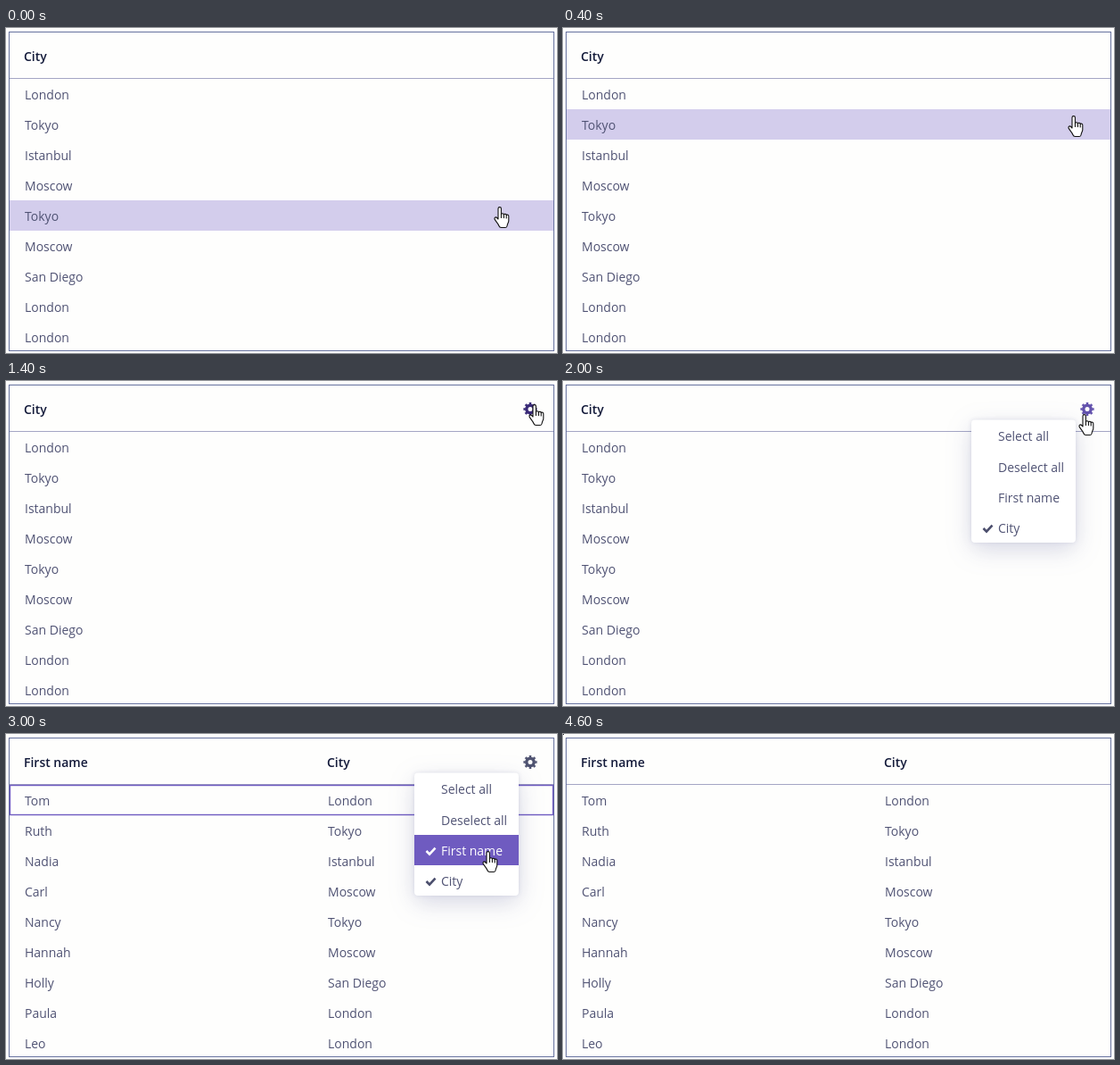
An HTML page for the animation above (5800 ms loop, 618x364 px).

```html
<!DOCTYPE html>
<html lang="en">
<head>
<meta charset="utf-8">
<title>Column chooser</title>
<style>
html, body { margin: 0; width: 100%; height: 100%; overflow: hidden; background: #fefefd; }
svg { display: block; width: 618px; height: 364px; }
text { font: 14px "Open Sans", sans-serif; fill: #505374; }
.head { font-weight: 600; fill: #131a3a; }
#menu { filter: drop-shadow(0 8px 14px rgba(80, 85, 150, .2)) drop-shadow(0 0 2px rgba(60, 65, 120, .14)); }
.tick { fill: none; stroke: #4a4d6c; stroke-width: 2.6; }
.on text { fill: #fff; }
.on .tick { stroke: #fff; }
.item rect { fill: none; }
.item.on rect { fill: #6f5bc0; }
</style>
</head>
<body>
<svg id="stage" viewBox="0 0 618 364">
  <defs>
    <clipPath id="gridClip"><rect x="4" y="5" width="610" height="356"/></clipPath>
  </defs>
  <rect width="618" height="364" fill="#fefefd"/>
  <g clip-path="url(#gridClip)">
    <rect id="hover" x="4" width="610" height="34" fill="#d3cdec"/>
    <g id="names"></g>
    <g id="cities"></g>
  </g>
  <path d="M4 56.5H614" stroke="#a4a6c4"/>
  <rect x="3.5" y="4.5" width="611" height="357" fill="none" stroke="#66719f"/>
  <rect id="focus" x="4.5" y="57.5" width="609" height="33" fill="none" stroke="#6f5bc0" stroke-width="1.4"/>
  <g id="gear" transform="translate(588 31.5)" fill="none" stroke="currentColor">
    <circle r="4.2" stroke-width="3.4"/>
    <circle r="6.2" stroke-width="2.8" pathLength="16" stroke-dasharray="1 1" stroke-dashoffset=".5"/>
  </g>
  <g id="menu"><rect x="458" y="43.5" width="117" height="137.5" rx="4" fill="#fff"/></g>
  <g id="hand" stroke="#111" stroke-width="1.1" stroke-linejoin="round" stroke-linecap="round">
    <path fill="#fff" d="M5 14V2.3a1.7 1.7 0 0 1 3.4 0V8.5c.6-1.2 2.8-1 3 .4c.7-1 2.6-.7 2.8.6c.9-.7 2.6-.2 2.6 1.3V16c0 2-1.5 3-1.7 5.5c-.2 1.8-.9 2-2 2H8.3c-1.4 0-1.9-.6-2.3-1.7C5.4 19.7 3 17.5 1.2 14.4C.2 12.4 2.3 11.2 3.6 12.5z"/>
    <path fill="none" d="M8.4 8.5v4M11.4 9v3.6M14.2 9.6V13"/>
  </g>
  <rect id="dot" width="1" height="1" fill="#222"/>
</svg>
<script>
const LOOP = 5800, ROW = 34;
const NAMES = ['Tom', 'Ruth', 'Nadia', 'Carl', 'Nancy', 'Hannah', 'Holly', 'Paula', 'Leo'];
const CITIES = ['London', 'Tokyo', 'Istanbul', 'Moscow', 'Tokyo', 'Moscow', 'San Diego', 'London', 'London'];
const ITEMS = [['Select all', 44], ['Deselect all', 78.5], ['First name', 113], ['City', 147]];
const GRAY = '#505472', HOVER = '#6453ad', PRESSED = '#3a2b78';

const $ = id => document.getElementById(id);

function add(parent, tag, attrs, label = '') {
  const el = document.createElementNS('http://www.w3.org/2000/svg', tag);
  for (const key in attrs) el.setAttribute(key, attrs[key]);
  el.textContent = label;
  parent.append(el);
  return el;
}

function column(parent, title, values) {
  add(parent, 'text', { x: 20, y: 37, class: 'head' }, title);
  values.forEach((value, i) => add(parent, 'text', { x: 21, y: 80 + i * ROW }, value));
}
column($('names'), 'First name', NAMES);
column($('cities'), 'City', CITIES);

const items = ITEMS.map(([label, y]) => {
  const g = add($('menu'), 'g', { class: 'item' });
  add(g, 'rect', { x: 458, y, width: 117, height: 34 });
  add(g, 'text', { x: 488, y: y + 23 }, label);
  const tick = add(g, 'path', { class: 'tick', d: `M471.5 ${y + 18}l3.5 3.6l6.5-7` });
  return { g, tick };
});

// Each step lists only what changes; the rest carries over.
let last = {};
const steps = [
  [0, { hand: [547, 200], row: 4, gear: null, menu: 0, item: -1, both: false, checked: false, focus: false, dot: false }],
  [200, { hand: [553, 146], row: 2 }],
  [400, { hand: [566, 98], row: 1 }],
  [600, { hand: [581, 54], row: 0 }],
  [800, { hand: [584, 36], row: -1 }],
  [1000, { hand: [585, 28], gear: HOVER }],
  [1200, { hand: [586, 26] }],
  [1400, { gear: PRESSED }],
  [1600, { gear: HOVER, menu: .75 }],
  [1800, { hand: [584, 28], menu: 1 }],
  [2000, { hand: [578, 37] }],
  [2200, { hand: [556, 94], gear: GRAY, item: 1 }],
  [2400, { hand: [537, 125], item: 2 }],
  [2800, { checked: true }],
  [3000, { hand: [534, 131], both: true, focus: true }],
  [3400, { hand: [552, 112], item: 1, focus: false }],
  [3600, { hand: [600, 13], item: -1 }],
  [3800, { hand: null, gear: null }],
  [4200, { dot: true }],
  [4400, { menu: .75 }],
  [4600, { menu: 0 }]
].map(([at, change]) => ({ at, ...(last = { ...last, ...change }) }));

const show = (el, visible) => { el.style.display = visible ? '' : 'none'; };

function render(s) {
  show($('hand'), s.hand);
  if (s.hand) $('hand').setAttribute('transform', `translate(${s.hand})`);
  show($('hover'), s.row >= 0);
  $('hover').setAttribute('y', 57 + s.row * ROW);
  show($('gear'), s.gear);
  $('gear').style.color = s.gear || '';
  show($('menu'), s.menu);
  $('menu').style.opacity = s.menu;
  items.forEach(({ g, tick }, i) => {
    g.classList.toggle('on', i === s.item);
    show(tick, i === 3 || (i === 2 && s.checked));
  });
  show($('names'), s.both);
  $('cities').setAttribute('transform', `translate(${s.both ? 340 : 0})`);
  show($('focus'), s.focus);
  show($('dot'), s.dot);
}

let current;
const start = performance.now();
function tick() {
  const t = (performance.now() - start) % LOOP;
  const step = steps.findLast(s => s.at <= t) || steps[0];
  if (step !== current) render(current = step);
  requestAnimationFrame(tick);
}
tick();
</script>
</body>
</html>
```
